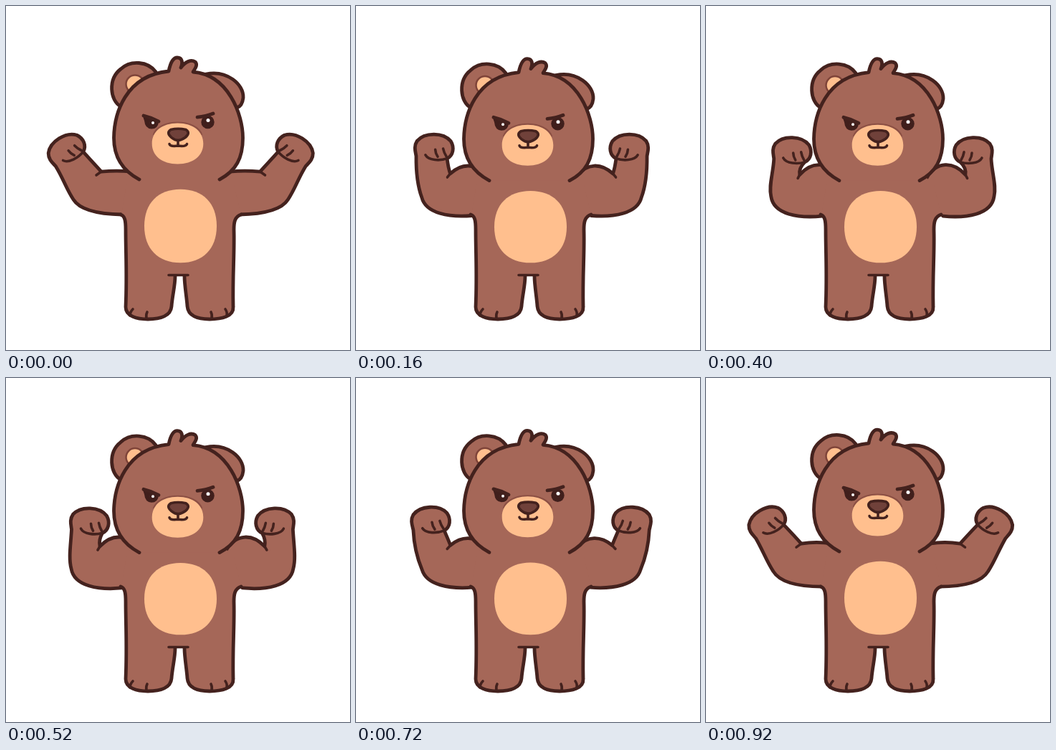
These frames come from a looping animation (480 px wide and 480 px high, 0.96 s). An HTML page:

```html
<!DOCTYPE html>
<html lang="en">
<head>
<meta charset="utf-8">
<title>Flexing bear</title>
<style>
  html, body { margin: 0; width: 100%; height: 100%; overflow: hidden; background: #fff; }
  svg { display: block; width: 100vw; height: 100vh; }
  .fur { fill: #a56758; }
  .line { fill: none; stroke: #44221e; stroke-width: 4.8; stroke-linecap: round; stroke-linejoin: round; }
  .fur.line { fill: #a56758; }
  .thin { stroke-width: 3.6; }
  .cream { fill: #ffbf8e; }
  .dark { fill: #401f1c; }
</style>
</head>
<body>
<svg viewBox="0 0 480 480">
  <defs>
    <g id="arm">
      <path id="armFill" class="fur"/>
      <path id="armLine" class="line"/>
      <path id="crease" class="line thin"/>
      <path id="fingers" class="line thin" d="M-12 11 C-8 19 8 20 18 17 M2 4 Q2 9 5 14 M13 3 Q14 9 17 14"/>
    </g>
  </defs>

  <use href="#arm"/>
  <use href="#arm" id="rightArm"/>

  <path class="fur" d="M180 236 L168 250 L161 291 Q167 294 167 312 L167 423 C168 435 185 437 198 437 C216 437 230 432 231 419 L237 376 H248 L253 419 C254 432 268 437 284 437 C302 437 317 433 317 423 L318 312 Q318 295 328 291 L318 250 L304 236Z"/>
  <path class="line" d="M160 291 C166 293 167 300 167 312 C167 345 169 375 167 420 C167 433 183 437 198 437 C216 437 230 432 231 419 C232 405 236 390 236 377 M328 291 C319 294 318 302 318 312 C319 345 316 375 317 420 C318 433 301 437 284 437 C267 437 254 432 253 419 C252 405 249 390 249 377"/>
  <path class="line thin" d="M227 375.500 H254 M177 423 Q173 427 173 432 M197 427 Q195 431 196 436 M306 423 Q309 427 308 432 M286 427 Q288 431 287 436"/>
  <path id="belly" class="cream"/>

  <g id="head">
    <path class="fur line" d="M160 140 C145 132 142 102 160 88 C174 75 198 77 209 92 M279 95 C308 89 332 109 331 128 C330 137 326 141 322 142"/>
    <circle cx="180" cy="109" r="12.5" class="cream" stroke="#7f4439" stroke-width="2.5"/>
    <path class="fur line" d="M186 242 C163 230 150.500 211 150.500 184 C151 151 166 97 227 91 C229 81 232 72 239 72 C246 72 247 79 244 86 C250 78 258 74 264 78 C268 82 264 87 261 92 C310 96 330.500 151 330.500 184 C330.500 212 321 230 298 242"/>
  </g>

  <g id="face">
    <path fill="none" stroke="#8c5044" stroke-width="2.5" d="M206 180 C212 157 267 157 273 180"/>
    <path id="muzzle" class="cream"/>
    <path class="line thin" style="fill:#70413a" d="M230 172.500 Q240 170 251 172.500 Q258 177 250 183.500 Q240 191 231 183.500 Q223 177 230 172.500Z"/>
    <path class="line thin" d="M240 188 V194 M228 192.500 Q229 196.500 240 195 Q251 196.500 252.500 192.500"/>
    <path class="dark" d="M191 154 L213 162 Q212 171.500 203 171.500 Q194 171 193 160Z"/>
    <circle class="dark" cx="281.500" cy="162" r="9.200"/>
    <circle fill="#fff" cx="205" cy="163" r="2"/>
    <circle fill="#fff" cx="282" cy="159.500" r="2.500"/>
    <path class="line" d="M192 153 Q203 155.500 213 161 M267 155 Q279 154 289 150"/>
  </g>
</svg>
<script>
const LOOP = 960, PEAK = 400, END = 930, MAX = 1.08;
const $ = id => document.getElementById(id);
const set = (id, name, value) => $(id).setAttribute(name, value);

// 0 = arms spread, 1 = flexed: quick rise, slower return
function flexAt(t) {
  if (t < PEAK) return MAX * (1 - (1 - t / PEAK) ** 2.3);
  return MAX * (1 - Math.min(1, (t - PEAK) / (END - PEAK)) ** 1.65);
}

function squircle(cx, cy, rx, ry, c) {
  const x = rx * c, y = ry * c;
  return `M${cx - rx} ${cy}c0 ${-y} ${rx - x} ${-ry} ${rx} ${-ry}s${rx} ${ry - y} ${rx} ${ry}` +
    `s${x - rx} ${ry} ${-rx} ${ry}s${-rx} ${y - ry} ${-rx} ${-ry}Z`;
}

// The fist is rigid and swings; shoulder and elbow follow the flex
function drawArm(k) {
  const root = Math.sqrt(k);
  const hx = 83 + 34 * k, hy = 199.5 + 3 * Math.sin(2 * Math.PI * k);
  const turn = -35 * (1 - k) ** 2;
  const c = Math.cos(turn * Math.PI / 180), s = Math.sin(turn * Math.PI / 180);
  const fist = (x, y) => `${hx + x * c - y * s} ${hy + x * s + y * c} `;
  const pt = (x, y) => `${x} ${y} `;

  const sx = 175 + 9 * k, top = 231 - 14 * root;
  const px = 133 - 2 * k, py = 231 + 4 * k;
  const ex = 94 - 3 * k, ey = 270 - 4 * k, lean = 10 - 6 * k;

  const outline = 'M' + pt(sx, 231 + 8 * k) +
    'C' + pt(sx - 14, top) + pt(148, top) + pt(px, py) +
    'Q' + pt(px - 9 + 7 * root, py - 9) + fist(18, 17) +
    'C' + fist(27, 13) + fist(29, 2) + fist(24, -7) +
    'C' + fist(14, -20) + fist(-12, -21) + fist(-23, -9) +
    'C' + fist(-28, -2) + fist(-26, 5) + fist(-25, 12) +
    'C' + fist(-26, 32) + pt(ex - lean, ey - 15) + pt(ex, ey) +
    'C' + pt(ex + lean, ey + 16 + 9 * k) + pt(133 - 3 * k, 290 + 6 * root) + pt(162, 291 + 2 * k);

  set('armLine', 'd', outline);
  set('armFill', 'd', outline + 'L200 300V240Z');
  set('crease', 'd', 'M' + pt(px, py) + 'L' + pt(126 + 2 * k, 236 + 4 * k));
  set('fingers', 'transform', `translate(${hx} ${hy}) rotate(${turn})`);
  set('rightArm', 'transform', `matrix(-1 0 0 1 ${487.5 + 4.5 * k * k} 0)`);
}

function draw(t) {
  const k = flexAt(t), sink = Math.min(1, k / .76);
  drawArm(k);
  set('head', 'transform', `translate(0 ${1.6 * sink})`);
  set('face', 'transform', `translate(0 ${2.3 * sink})`);
  set('belly', 'd', squircle(243.5, 307 + 1.2 * sink, 50.5, 51.3 - 1.2 * sink, .62));
}

set('muzzle', 'd', squircle(239.5, 192, 35.8, 28.5, .6));

const start = performance.now();
function tick() {
  draw((performance.now() - start) % LOOP);
  requestAnimationFrame(tick);
}
draw(0);
requestAnimationFrame(tick);
</script>
</body>
</html>
```
